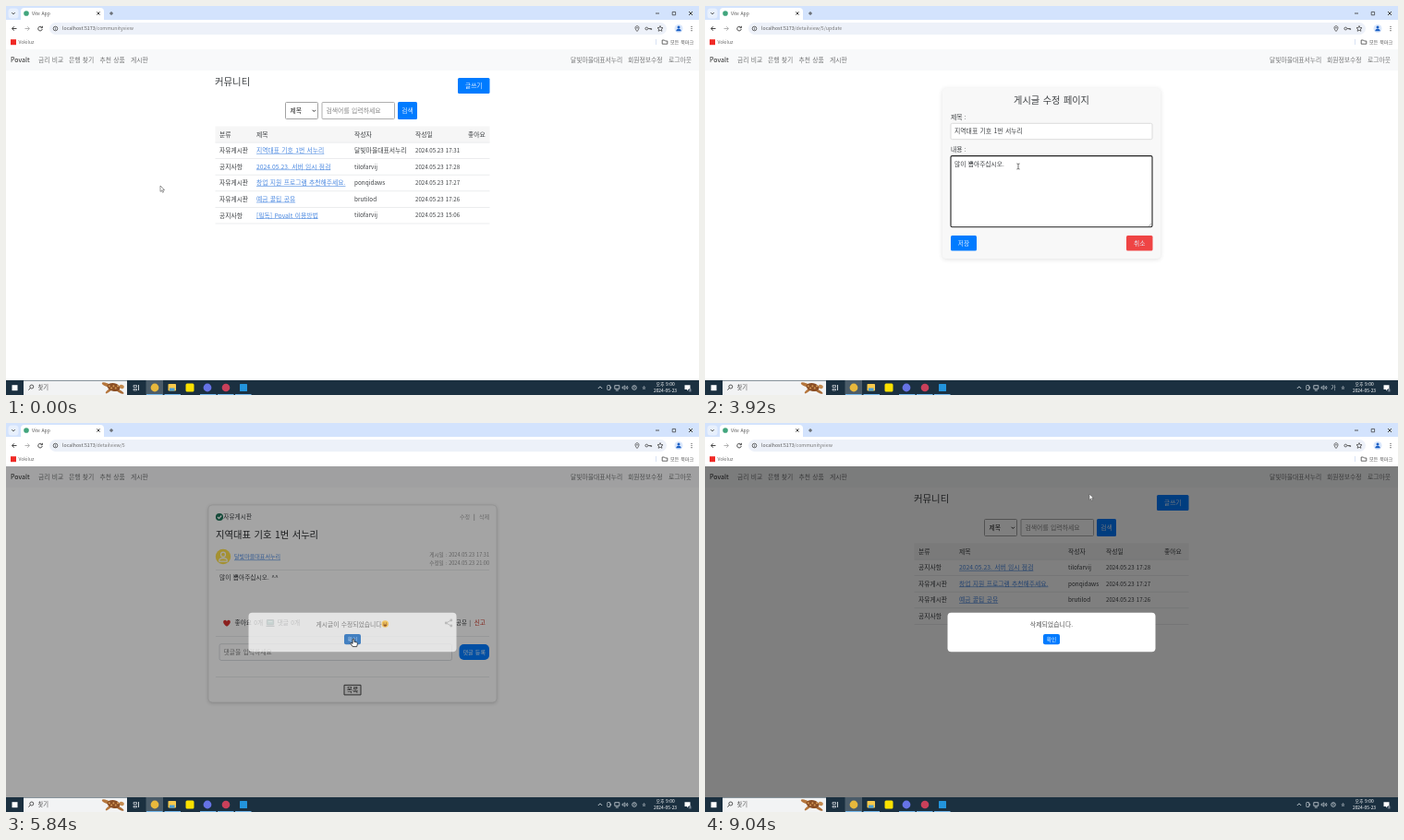
These frames come from a looping animation (750 by 422 pixels, 9.12 s). An HTML page with a canvas:

```html
<!DOCTYPE html>
<html lang="ko">
<head>
<meta charset="utf-8">
<title>Community board</title>
<style>
html, body { margin: 0; width: 100%; height: 100%; overflow: hidden; background: #fff; }
canvas { display: block; width: 750px; height: 422px; }
</style>
</head>
<body>
<canvas id="stage" width="750" height="422"></canvas>
<script>
const ctx = document.getElementById('stage').getContext('2d');
const LOOP = 9120;
const FONT = '"Noto Sans CJK KR", "Noto Sans CJK", "Noto Sans", sans-serif';
const INK = '#3c3f42', BLUE = '#007bff', LINK = '#4a88e0', LINE = '#e6e8ea', GREY = '#858585';
const SITE = 'Povalt', USER = '달빛마을대표서누리', TITLE = '지역대표 기호 1번 서누리';

// Times of clicks and page changes, in ms
const T = {
  open: 960, edit: 2160, focus: 3380, typed: [4000, 4160, 4320],
  saved: 5240, savedOk: 5800, ask: 6640, removed: 7900, askEnd: 7990
};

// Pointer stops: time, x, y
const PATH = [
  [0, 167, 195], [160, 167, 195], [680, 305, 156], [1000, 305, 156], [1680, 495, 103],
  [2200, 495, 103], [3250, 350, 171], [3520, 350, 171], [3680, 339, 174], [4480, 339, 174],
  [5000, 281, 257], [5280, 281, 257], [5600, 376, 234], [5860, 376, 234], [6400, 519, 104],
  [6900, 519, 104], [7560, 416, 77], [LOOP, 416, 77]
];

const clamp = v => Math.max(0, Math.min(1, v));
const ramp = (t, from, len) => clamp((t - from) / len);
const ease = p => p * p * (3 - 2 * p);

// y is the middle of the line of text
function text(s, x, y, size = 6.85, color = INK, weight = 400, align = 'left') {
  ctx.font = `${weight} ${size}px ${FONT}`;
  ctx.wordSpacing = `${size * 0.12}px`;
  ctx.fillStyle = color;
  ctx.textAlign = align;
  ctx.fillText(s, x, y + size * 0.36);
  return ctx.measureText(s).width;
}
const mid = (s, x, y, size, color, weight) => text(s, x, y, size, color, weight, 'center');

function rect(x, y, w, h, color) {
  ctx.fillStyle = color;
  ctx.fillRect(x, y, w, h);
}

function box(x, y, w, h, r, fill, stroke, width = 1) {
  ctx.beginPath();
  ctx.roundRect(x, y, w, h, r);
  if (fill) { ctx.fillStyle = fill; ctx.fill(); }
  if (stroke) { ctx.strokeStyle = stroke; ctx.lineWidth = width; ctx.stroke(); }
}

function disc(x, y, r, fill, stroke, width = 0.8) {
  ctx.beginPath();
  ctx.arc(x, y, r, 0, 7);
  if (fill) { ctx.fillStyle = fill; ctx.fill(); }
  if (stroke) { ctx.strokeStyle = stroke; ctx.lineWidth = width; ctx.stroke(); }
}

function oval(x, y, rx, ry, turn, fill) {
  ctx.beginPath();
  ctx.ellipse(x, y, rx, ry, turn, 0, 7);
  ctx.fillStyle = fill;
  ctx.fill();
}

// Path in SVG notation, relative to x, y
function draw(d, x, y, stroke, width = 0.9, fill) {
  const p = new Path2D(d);
  ctx.save();
  ctx.translate(x, y);
  if (fill) { ctx.fillStyle = fill; ctx.fill(p); }
  if (stroke) { ctx.strokeStyle = stroke; ctx.lineWidth = width; ctx.stroke(p); }
  ctx.restore();
}

function shadow(blur, y, alpha, paint) {
  ctx.save();
  ctx.shadowColor = `rgba(0,0,0,${alpha})`;
  ctx.shadowBlur = blur;
  ctx.shadowOffsetY = y;
  paint();
  ctx.restore();
}

function link(s, x, y, size) {
  const w = text(s, x, y, size, LINK);
  rect(x, y + 3.2, w, 0.6, LINK);
}

function button(s, x, y, w, h, r, color = BLUE, size = 6.7) {
  box(x, y, w, h, r, color);
  mid(s, x + w / 2, y + h / 2, size, '#e6f1ff');
}

function browser(path) {
  rect(0, 0, 750, 16, '#d3e3fd');
  rect(0, 15, 750, 32, '#fff');
  box(2.5, 2.5, 11, 11, 3.5, '#e8f0fd');
  draw('M-1.7-.8L0 .9 1.7-.8', 8, 8, '#333');
  box(16, 2, 90, 16, [4, 4, 0, 0], '#fff');
  disc(22, 8, 2.8, '#41a57d');
  text('Vite App', 28, 8.2, 5, '#555');
  draw('M-1.6-1.6L1.6 1.6M1.6-1.6L-1.6 1.6', 100, 8, '#333');
  draw('M-2 0H2M0-2V2', 114, 8, '#444');
  draw('M-2 .5H2', 705, 7.5, '#444');
  box(721.2, 6.4, 3.4, 3.4, 0, null, '#444', 0.8);
  draw('M-2-2L2 2M2-2L-2 2', 741, 8, '#333');

  draw('M2.5 0H-2.3M-.2-2.2L-2.4 0-.2 2.2', 9, 24.5, '#333');
  draw('M-2.5 0H2.3M.2-2.2L2.4 0 .2 2.2', 23, 24.5, '#aaa');
  draw('M1.7-1.5A2.3 2.3 0 1 0 2.3.5M2.4-2.7V-.8H.5', 37, 24.5, '#333');
  box(47, 18, 668, 13, 6.5, '#edf1f9');
  disc(53.5, 24.5, 2.3, null, '#444', 0.8);
  draw('M0-.3V1.3M0-1.4V-.8', 53.5, 24.5, '#444', 0.7);
  const w = text('localhost:5173', 61, 24.6, 5.25, '#555');
  text('/' + path, 61 + w, 24.6, 5.25, '#777');
  draw('M0 3C-3-.3-2.2-2.8 0-2.8S3-.3 0 3Z', 683, 24.5, '#444', 0.8);
  disc(683, 23.7, 0.7, '#444');
  disc(693.3, 24.5, 1.4, null, '#444', 0.8);
  draw('M0 0H3.6V1.5M2.2 0V1.3', 695, 24.5, '#444', 0.8);
  draw('M0-3L.9-.9 3-.8 1.4.6 1.9 2.8 0 1.6-1.9 2.8-1.4.6-3-.8-.9-.9Z', 708, 24.5, '#333', 0.7);
  disc(728, 24.5, 4.5, '#dbe8fc');
  disc(728, 23, 1.5, '#1a5fc4');
  draw('M-2.7 2.8A2.7 2.5 0 0 1 2.7 2.8Z', 728, 24.5, null, 1, '#1a5fc4');
  for (const y of [22.3, 24.5, 26.7]) disc(742, y, 0.6, '#333');

  box(5, 36.2, 6, 6, 0, '#f02a26');
  text('Vokiluz', 13.5, 39.2, 5, '#666');
  rect(703, 36, 0.7, 6, '#c8d6ef');
  draw('M-2.8-2H-.5L.4-1H2.8V2.2H-2.8Z', 713, 39, '#444', 0.8);
  text('모든 북마크', 719, 39.2, 5.1, '#555');
}

function navbar() {
  rect(0, 47, 750, 23, '#f8f9fa');
  text(SITE, 5, 58.7, 7, '#222', 500);
  const items = [['금리 비교', 35], ['은행 찾기', 68], ['추천 상품', 101.5], ['게시판', 135],
    [USER, 611], ['회원정보수정', 673], ['로그아웃', 717]];
  for (const [s, x] of items) text(s, x, 58.6, 6.8, '#737475');
}

function turtle() {
  oval(109, 411, 5.5, 1.8, 0.35, '#b5763d');
  oval(123, 418, 5, 1.5, 0.5, '#a86a35');
  oval(111, 417.5, 4, 1.4, -0.7, '#b5763d');
  oval(125.3, 413, 2.6, 2, 0.3, '#c48b50');
  oval(116.5, 413.5, 7, 4.4, 0.2, '#8a4e25');
  for (let i = 0; i < 5; i++) oval(111.8 + i * 2.3, 412.3 + (i % 2) * 2.2, 1, 1.1, 0, '#d49a58');
}

function taskbar(korean) {
  rect(0, 406, 750, 16, '#1b3040');
  rect(6.5, 411.2, 6, 6, '#fff');
  rect(19, 406.5, 112, 15.5, '#f2f3f4');
  disc(27.8, 413, 2, null, '#333', 0.8);
  draw('M-1.4 1.4L-3.4 3.6', 27.8, 413, '#333');
  text('찾기', 34.5, 414, 6.3, '#555');
  turtle();
  box(138, 411.5, 3.5, 2, 0, null, '#e5e9ec', 0.7);
  box(138, 415.5, 3.5, 1.5, 0, null, '#e5e9ec', 0.7);
  draw('M0-3V3', 143.5, 414, '#e5e9ec');
  rect(151.5, 406, 18.5, 16, '#4b5c69');
  disc(161, 414, 4.4, '#e8b83c');
  box(175.5, 410, 8.5, 7.5, 0.7, '#f6c94c');
  rect(177, 414.5, 5.5, 3, '#4a9fd8');
  box(194.5, 409.5, 9, 9, 1.5, '#fae100');
  disc(218, 414, 4.4, '#6673e6');
  disc(238, 414, 4.3, '#c9405a');
  box(253, 410, 8, 8, 0.5, '#2394dc');
  for (const x of [152, 171.5, 210, 229, 248]) rect(x, 421, 17.5, 1, '#76b9ed');

  const c = '#cdd5da';
  draw('M-2.2 1L0-1.2 2.2 1', 643, 414, c);
  box(650.8, 411.5, 3, 5, 0.5, null, c, 0.7);
  draw('M0-1.5L1.6 0 0 1.5', 653.5, 414, c, 0.7);
  box(658.8, 411.7, 5, 3.6, 0, null, c, 0.8);
  draw('M-1.5 3H1.5', 661.3, 414, c);
  draw('M-3-.8H-1.8L-.2-2.2V2.2L-1.8.8H-3ZM1-1.2Q2 0 1 1.2M2.2-2Q3.8 0 2.2 2', 670, 414, c, 0.7);
  if (korean) mid('가', 680, 414, 5.8, c);
  else { disc(680, 414, 2.3, null, c, 0.8); mid('A', 680, 414, 3.2, c); }
  mid('ㅎ', 690.5, 414, 5.8, c);
  mid('오후 9:00', 713.5, 410.7, 4.9, '#fff');
  mid('2024-05-23', 713.5, 417.5, 4.9, '#fff');
  draw('M-3-2.8H3V2H1L-.4 3.4V2H-3Z', 737.5, 414, null, 1, '#fff');
  disc(740.3, 417, 2, '#46586a');
  mid('3', 740.3, 417, 2.8, '#fff');
}

function listPage(removed) {
  text('커뮤니티', 226, 82.6, 10.4);
  button('글쓰기', 489, 78, 34.5, 17, 1.5);
  box(302.5, 104.5, 35, 18, 1, '#fff', '#999', 0.9);
  text('제목', 307.5, 113.5, 6.8, '#222');
  draw('M-1.7-.8L0 .9 1.7-.8', 333.3, 113.6, '#333', 1);
  box(342, 104.5, 78.5, 18, 1, '#fff', '#a6a6a6', 0.9);
  text('검색어를 입력하세요', 346.5, 113.5, 6.85, GREY);
  button('검색', 424, 104, 21, 19, 1.5);

  const cols = removed ? [231, 275, 393, 434, 497] : [231, 271, 377, 443, 500];
  rect(226.5, 130.5, 297, 17.5, '#f6f6f6');
  ['분류', '제목', '작성자', '작성일', '좋아요'].forEach((s, i) => text(s, cols[i], 139.2, 6.8, INK, 500));
  rect(226.5, 147.7, 297, 0.8, LINE);
  const rows = [
    ['자유게시판', TITLE, USER, '17:31'],
    ['공지사항', '2024.05.23. 서버 임시 점검', 'tilofarvij', '17:28'],
    ['자유게시판', '창업 지원 프로그램 추천해주세요.', 'ponqidaws', '17:27'],
    ['자유게시판', '예금 꿀팁 공유', 'brutilod', '17:26'],
    ['공지사항', `[필독] ${SITE} 이용방법`, 'tilofarvij', '15:06']
  ].slice(removed ? 1 : 0);
  rows.forEach(([kind, title, user, time], i) => {
    const y = 156.7 + i * 17.6;
    text(kind, cols[0], y, 6.75);
    link(title, cols[1], y, 6.8);
    text(user, cols[2], y, user === USER ? 6.85 : 6.4);
    text('2024.05.23 ' + time, cols[3], y, 6.15);
    rect(226.5, y + 8.5, 297, 0.8, LINE);
  });
}

function heart(x, y) {
  draw('M0 3.8C-6-.4-3.6-3.7-1.7-3.3Q-.4-3 0-1.8Q.4-3 1.7-3.3C3.6-3.7 6-.4 0 3.8Z', x, y, null, 1, '#d8322f');
}

function share(x, y) {
  draw('M2.8-3L-2.8 0 2.8 3', x, y, '#222', 1);
  for (const [a, b] of [[2.8, -3], [-2.8, 0], [2.8, 3]]) disc(x + a, y + b, 1.4, '#222');
}

function detailPage(edited) {
  shadow(4, 1, 0.2, () => box(219, 89, 312, 214, 4, '#fff'));
  box(219, 89, 312, 214, 4, null, '#dfdfdf', 0.7);
  disc(231, 102, 4.1, '#21745a');
  draw('M-2 0L-.5 1.6 2.2-1.5', 231, 102, '#fff', 1.2);
  text('자유게시판', 235.3, 101.7, 6.7);
  text('수정', 491, 101.7, 6.1, '#a3a3a3');
  mid('|', 507, 101.5, 6.5, '#555');
  text('삭제', 512, 101.7, 6.1, '#a3a3a3');
  text(TITLE, 227, 121.3, 10.3, '#25282b', 500);
  disc(235, 145, 8.2, '#ffe14d');
  disc(235, 142.7, 2.5, null, '#fff', 1.2);
  draw('M-4.2 5.2V3.8Q-4 1.7 0 1.7T4.2 3.8V5.2Z', 235, 145, '#fff', 1.2);
  link(USER, 247, 145.3, 6.05);
  text('게시일 : 2024.05.23 17:31', 523, 142.8, 5.6, '#959595', 400, 'right');
  text('수정일 : 2024.05.23 ' + (edited ? '21:00' : '17:31'), 523, 151.6, 5.6, '#959595', 400, 'right');
  for (const y of [159, 231, 275]) rect(227, y, 296, 0.8, LINE);
  text('많이 뽑아주십시오.' + (edited ? ' ^^' : ''), 231, 168, 6.75);

  heart(239, 217);
  text('좋아요 0개', 247.5, 216.6, 6.7);
  box(282.3, 213.5, 7.4, 5.4, 0.5, '#64a39a', '#4b5b5e', 0.8);
  rect(283.8, 215.2, 4.4, 0.8, '#dff2ee');
  rect(281.5, 219.8, 9, 1.1, '#4b5b5e');
  text('댓글 0개', 293.7, 216.6, 6.7);
  share(479, 217);
  text('공유 |', 487, 216.6, 6.5);
  text('신고', 506.7, 216.6, 6.7, '#c73222', 500);
  box(231, 239.7, 251.5, 17.8, 2, '#fff', '#d2d6da', 0.8);
  text('댓글을 입력하세요', 235.5, 248.6, 6.8, GREY);
  button('댓글 등록', 490.5, 240, 32.5, 17, 5, BLUE, 6.1);
  box(366, 284.3, 18, 10.6, 0, '#efefef', '#444', 1);
  mid('목록', 375, 289.6, 6.8, '#222');
}

function editPage(t) {
  shadow(5, 1, 0.12, () => box(257, 89, 236, 185, 4, '#f8f8f8'));
  mid('게시글 수정 페이지', 375, 102.3, 10.2);
  text('제목 :', 266, 120.7, 6.8);
  box(266, 127.3, 218, 17.4, 1.5, '#fff', '#d4d4d4', 0.8);
  text(TITLE, 270, 136, 6.85);
  text('내용 :', 266, 156, 6.8);
  const focused = t >= T.focus;
  box(266, 162.6, 218, 77.2, 1.5, '#fff', focused ? '#222' : '#d4d4d4', focused ? 1.1 : 0.8);
  draw('M-3 0L0-3M-1.3 0L0-1.3', 483, 239, '#777', 0.5);
  const count = T.typed.filter(at => t >= at).length;
  const w = text('많이 뽑아주십시오.' + ' ^^'.slice(0, count), 270, 171.2, 6.75);
  const since = t - (count ? T.typed[count - 1] : T.focus);
  if (focused && since % 1060 < 530) rect(270.3 + w, 167.6, 0.7, 7.5, '#111');
  button('저장', 266, 249, 28, 16.5, 1.5);
  button('취소', 456, 249, 28.5, 16.5, 1.5, '#ef4444');
}

function smile(x, y) {
  disc(x, y, 3.7, '#f5b62c');
  disc(x - 1.3, y - 1, 0.6, '#4b2f14');
  disc(x + 1.3, y - 1, 0.6, '#4b2f14');
  draw('M-2.2.5H2.2Q1.6 2.7 0 2.7T-2.2.5Z', x, y, null, 1, '#6b2f1a');
}

function modal(alpha, saved, hover) {
  if (alpha <= 0) return;
  ctx.save();
  ctx.globalAlpha = alpha;
  rect(0, 47, 750, 359, 'rgba(0,0,0,.5)');
  box(262.5, 205.7, 225, 42.5, 4, '#fff');
  if (saved) {
    text('게시글이 수정되었습니다', 335.5, 218.2, 6.8, '#555');
    smile(410.3, 218);
  } else mid('삭제되었습니다.', 375, 218.2, 6.9, '#555');
  button('확인', 366, 229, 18, 11.3, 2, hover ? '#0056b3' : BLUE, 5.7);
  ctx.restore();
}

function confirmBox(alpha, ring) {
  if (alpha <= 0) return;
  ctx.save();
  ctx.globalAlpha = alpha;
  shadow(5, 1, 0.35, () => box(287.5, 30, 175, 57.3, 4, '#fff'));
  text('localhost:5173 내용:', 295.5, 42.7, 6.3, '#444');
  const x = 296.5 + text('정말로 게시글을 삭제하시겠습니까', 295.5, 54.2, 5.5, '#444');
  rect(x, 51.3, 1.5, 3.8, '#cf2f2f');
  disc(x + 0.75, 56.3, 0.8, '#cf2f2f');
  draw('M-1.3-1.2Q-1.1-2.5.1-2.5T1.4-1.2Q1.3-.4.1.2V1', x + 4.3, 54, '#cf2f2f', 1.1);
  disc(x + 4.4, 56.3, 0.8, '#cf2f2f');
  if (ring) box(400.8, 64.2, 26.4, 15.6, 7.8, '#fff', '#0b57d0', 1);
  button('확인', 402, 65.3, 24, 13.4, 6.7, '#0b57d0', 5.4);
  box(430.5, 65.3, 24, 13.4, 6.7, '#fff', '#c2d4f0', 0.8);
  mid('취소', 442.5, 72, 5.4, '#0b57d0');
  ctx.restore();
}

function pointerAt(t) {
  const i = PATH.findIndex(p => p[0] > t);
  const [t0, x0, y0] = PATH[i - 1], [t1, x1, y1] = PATH[i];
  const p = ease((t - t0) / (t1 - t0));
  return [x0 + (x1 - x0) * p, y0 + (y1 - y0) * p];
}

const inside = ([x, y], [l, t, r, b]) => x >= l && x <= r && y >= t && y <= b;
const OK = [366, 229, 384, 240.5];
const HOT = {
  list: [[271, 152, 344, 161]],
  detail: [[491, 98, 502, 106], [512, 98, 523, 106]],
  edit: [[266, 249, 294, 266], [456, 249, 484, 266]]
};
const FIELDS = [[266, 127, 484, 145], [266, 163, 484, 240]];

function pointer([x, y], kind) {
  if (kind === 'hand') {
    draw('M-.9.7Q0-.7.9.7V3.3L3.6 4Q4.6 4.4 4.4 5.6L3.7 8.6H-.8L-3.2 5.2Q-3.2 4 -2 4.5L-.9 5.4Z', x, y, '#222', 0.8, '#fff');
  } else if (kind === 'beam') {
    draw('M-1.6-3Q0-3 0-2.2Q0-3 1.6-3M0-2.2V2.2M-1.6 3Q0 3 0 2.2Q0 3 1.6 3', x, y, '#333', 0.7);
  } else {
    draw('M0 0V6.4L1.5 5 2.5 7.3 3.6 6.8 2.6 4.6H4.6Z', x, y, '#555', 0.6, '#fff');
  }
}

function frame(t) {
  const page = t < T.open || t >= T.removed ? 'list' : t < T.edit || t >= T.saved ? 'detail' : 'edit';
  const path = { list: 'communityview', detail: 'detailview/5', edit: 'detailview/5/update' }[page];
  const at = pointerAt(t);

  rect(0, 0, 750, 422, '#fff');
  navbar();
  if (page === 'list') listPage(t >= T.removed);
  else if (page === 'detail') detailPage(t >= T.saved);
  else editPage(t);

  const savedAlpha = ramp(t, T.saved, 140) * (1 - ramp(t, T.savedOk, 140));
  const goneAlpha = ramp(t, T.removed, 90);
  const overOk = inside(at, OK);
  modal(savedAlpha, true, overOk);
  modal(goneAlpha, false, overOk);
  browser(path);
  taskbar(t >= T.focus && t < T.saved);
  confirmBox(ramp(t, T.ask, 120) * (1 - ramp(t, T.askEnd, 120)), t < T.removed);

  const modalOpen = savedAlpha + goneAlpha > 0;
  const hot = modalOpen ? [OK] : HOT[page];
  const kind = hot.some(b => inside(at, b)) ? 'hand'
    : page === 'edit' && FIELDS.some(b => inside(at, b)) ? 'beam' : 'arrow';
  pointer(at, kind);
}

const start = performance.now();
function tick() {
  frame((performance.now() - start) % LOOP);
  requestAnimationFrame(tick);
}
tick();
</script>
</body>
</html>
```
